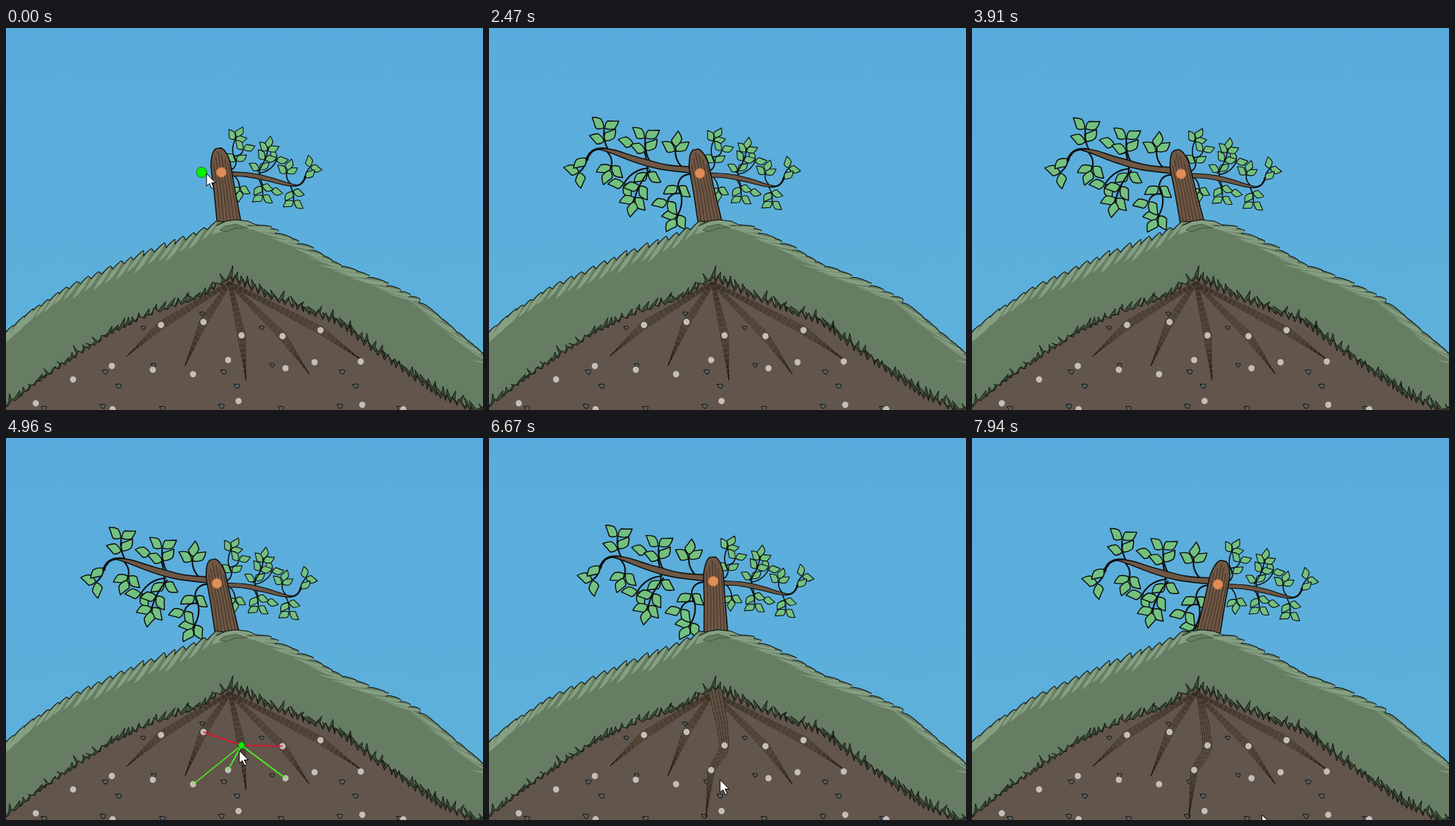
Recreate the animation shown at these times as an HTML page with a canvas. Size 640 by 512 pixels, loop 8000 ms.

```html
<!DOCTYPE html>
<html lang="en">
<head>
<meta charset="utf-8">
<title>Growing tree</title>
<style>
html, body { margin: 0; width: 100%; height: 100%; overflow: hidden; background: #5bacdb; }
canvas { display: block; }
</style>
</head>
<body>
<canvas id="stage" width="640" height="512"></canvas>
<script>
const W = 640, H = 512, LOOP = 8000;
const INK = '#0b0d0a', GRASS = '#667d63', LIGHT = '#859f82', DARK = '#3e4d3c', DIRT = '#62554b', BARK = '#6e5745';
const ctx = document.getElementById('stage').getContext('2d');

let seed = 7;
const rnd = () => (seed = (seed * 16807) % 2147483647) / 2147483647;
const span = (a, b) => a + (b - a) * rnd();

// ---------- timing: [time, x, y] ----------
const SWAY = [[150, 289], [1400, 284.5], [2470, 283], [3910, 280.5], [4440, 280.5], [4960, 283], [5650, 284],
  [6670, 301], [7940, 330]];
const POINTER = [[150, 269, 195], [1150, 270, 117], [1480, 270, 117], [2200, 478, 281], [2460, 680, 330],
  [4300, 680, 500], [4540, 480, 452], [4850, 313, 419], [5120, 313, 419], [5500, 300, 447], [6670, 310, 458],
  [6820, 310, 458], [7940, 389, 505]];
const SPROUT = 1270, PICK = 4800, ROOTED = 5500;

function at(keys, t, k = 1) {
  let i = 1;
  while (i < keys.length - 1 && keys[i][0] < t) i++;
  const a = keys[i - 1], b = keys[i];
  const f = Math.max(0, Math.min(1, (t - a[0]) / (b[0] - a[0])));
  return a[k] + (b[k] - a[k]) * f;
}

// ---------- shape helpers ----------
function paint(c, fill, line, w) {
  if (fill) { c.fillStyle = fill; c.fill(); }
  if (line) { c.strokeStyle = line; c.lineWidth = w; c.stroke(); }
}
function poly(c, pts, fill, line, w = 1, close = true) {
  c.beginPath();
  pts.forEach(p => c.lineTo(p[0], p[1]));
  if (close) c.closePath();
  paint(c, fill, line, w);
}
function dot(c, x, y, r, fill, line) {
  c.beginPath();
  c.arc(x, y, r, 0, 7);
  paint(c, fill, line, 1);
}
function layer(draw) {
  const c = document.createElement('canvas');
  c.width = W;
  c.height = H;
  draw(c.getContext('2d'));
  return c;
}
// points along an edge at irregular steps
function walk(edge, lo, hi) {
  const out = [];
  for (let x = edge[0][0]; x < W + 5;) {
    const slope = (at(edge, x + 4) - at(edge, x - 4)) / 8;
    out.push({ x, y: at(edge, x), slope });
    x += span(lo, hi) / Math.hypot(1, slope);
  }
  return out;
}

// ---------- hill ----------
const TOP = [[-12, 418], [20, 391], [75, 354], [165, 313], [240, 285], [285, 263], [308, 259], [345, 268],
  [395, 291], [440, 317], [500, 341], [550, 365], [590, 399], [645, 445]];
const UNDER = [[-5, 510], [50, 468], [145, 405], [200, 379], [265, 357], [302, 333], [350, 356], [450, 394],
  [490, 426], [540, 460], [585, 491], [645, 517]];

function grassTop(c) {
  const blades = walk(TOP, 12, 18).filter(p => p.x < 280 || p.x > 325).map(p => {
    const left = p.x < 300, r = span(.7, 1.25);
    return { ...p, left, tx: p.x + (left ? 11 : 21) * r, ty: p.y + (left ? -10 * r : 21 * r * p.slope - 4) };
  });
  c.beginPath();
  for (const b of blades) {
    c.lineTo(b.x, b.y + 1);
    c.quadraticCurveTo(b.x + (b.left ? 3 : 8), b.y - (b.left ? 4 : 1), b.tx, b.ty);
  }
  paint(c, null, INK, 2);
  c.lineTo(W + 10, H + 10);
  c.lineTo(-10, H + 10);
  c.closePath();
  paint(c, GRASS);
  for (const b of blades) {
    const d = span(15, 25), dir = b.left ? -.55 : -1.3;
    const ex = b.x + d * dir, ey = b.y + (b.left ? d : d * dir * b.slope + 9);
    c.beginPath();
    c.moveTo(b.tx, b.ty);
    c.quadraticCurveTo(b.x - 2, b.y + 2, ex, ey);
    c.quadraticCurveTo(b.x + 2, b.y + (b.left ? d * .6 : 7), b.tx, b.ty + 3);
    c.closePath();
    paint(c, LIGHT);
  }
  // tuft around the foot of the trunk
  const tuft = [[282, 265], [295, 259], [308, 257], [325, 259], [338, 265]];
  poly(c, [...tuft, [322, 264], [330, 269], [308, 266], [292, 272], [276, 277]], LIGHT);
  poly(c, tuft, null, INK, 1, false);
  poly(c, [[287, 271], [293, 266], [308, 263], [324, 268], [308, 268], [295, 273]], GRASS, '#34442f', .7);
}

function soil(c) {
  const pts = walk(UNDER, 7, 12);
  for (const { x, y } of pts) {
    const h = span(3, 12) + Math.max(0, 6 - Math.abs(x - 302)), lean = span(-7, 7);
    poly(c, [[x - 6, y + 5], [x - 2, y - 1], [x + lean, y - h], [x + 3, y], [x + 7, y + 6]], DARK, INK, .8);
  }
  const rim = pts.flatMap(({ x, y }) => [[x - 3, y + 5], [x + span(-2, 3), y - span(-1, 5)]]);
  poly(c, [...rim, [W + 10, 530], [-10, 530]], DIRT, INK, .9);

  // a stone pattern repeated every 159 px
  const stones = [[104, 383], [25, 402], [39, 452], [-26, 461], [-8, 480], [-29, 507], [51, 510]];
  for (let k = 0; k < 4; k++)
    for (const [x, y] of stones) {
      const sx = x + 159 * k, r = y > 455 ? 4 : 3.3;
      if (y < at(UNDER, sx) + 10) continue;
      poly(c, [[sx - r, y - r * .6], [sx + r * .4, y - r * .7], [sx + r, y - r * .4], [sx + r * .5, y + r * .7],
        [sx - r * .3, y + r * .6]], '#596064', INK, .9);
    }
}

const sky = layer(c => {
  const g = c.createLinearGradient(0, 0, 0, 450);
  g.addColorStop(0, '#5aabdd');
  g.addColorStop(1, '#5db1da');
  c.fillStyle = g;
  c.fillRect(0, 0, W, H);
});
const ground = layer(c => {
  c.lineJoin = 'round';
  grassTop(c);
  soil(c);
});

// ---------- roots ----------
const TIPS = [[162, 440], [240, 453], [407, 464], [477, 445]];
const NODES = [[208, 398], [265, 394], [371, 413], [422, 405], [316, 412], [298, 445], [251, 464], [375, 456],
  [476, 447], [414, 448], [197, 458], [142, 453], [90, 471], [40, 503], [143, 511], [312, 500], [478, 505], [533, 511]];
const [HUB, NEXT] = NODES.slice(4);

// knots: [x, y, half width]
function root(knots) {
  const side = k => knots.map(([x, y, w], i) => {
    const a = knots[Math.max(0, i - 1)], b = knots[Math.min(knots.length - 1, i + 1)];
    const dx = b[0] - a[0], dy = b[1] - a[1], s = k * w / Math.hypot(dx, dy);
    return [x - dy * s, y + dx * s];
  });
  poly(ctx, [...side(-1), ...side(1).reverse()], '#5e5142');
  ctx.setLineDash([6, 1]);
  for (let k = -1; k <= 1.01; k += .5) poly(ctx, side(k), null, 'rgba(24,18,10,.75)', .8, false);
  ctx.setLineDash([]);
}

function drawRoots(t) {
  TIPS.forEach(([x, y], i) => root([[300, 342, 2], [...NODES[i], 5], [x, y, 0]]));
  if (t < ROOTED) return root([[300, 340, 2], [...HUB, 5], [322, 472, 0]]);
  const w = at([[6750, 9], [7800, 2]], t);
  root([[303, 338, w], [312, 380, Math.max(w * .8, 5.5)], [...HUB, 6], [313, 423, 5.5], [...NEXT, 4.5], [291, 508, 0]]);
}

function drawLinks() {
  [1, 2, 5, 6, 7].forEach(i => poly(ctx, [HUB, NODES[i]], null, i < 3 ? '#f00a28' : '#4bf520', 1.6, false));
  dot(ctx, ...HUB, 4.2, '#08f008', '#0a8a20');
}

// ---------- tree ----------
// twig: start, end, bend, number of leaves
const TWIGS = [[163, 166, 156, 135, -3, 4], [212, 180, 196, 156, 6, 1], [219, 182, 211, 148, -3, 4],
  [262, 188, 252, 160, -4, 3], [133, 175, 123, 193, -2, 2], [138, 169, 132, 174, 0, 1], [160, 166, 164, 190, -4, 3],
  [216, 188, 183, 208, 5, 2], [214, 182, 214, 194, 0, 2], [218, 190, 196, 232, 3, 5], [272, 196, 255, 212, 5, 2],
  [256, 213, 252, 255, -6, 3], [258, 222, 241, 232, 4, 2]];

function leaf(x, y, angle) {
  ctx.save();
  ctx.translate(x, y);
  ctx.rotate(angle);
  ctx.beginPath();
  ctx.moveTo(1, 0);
  ctx.quadraticCurveTo(4, -6, 9, -7);
  ctx.quadraticCurveTo(14, -4, 22, 0);
  ctx.quadraticCurveTo(17, 5, 12, 6.5);
  ctx.quadraticCurveTo(5, 5, 1, 0);
  ctx.closePath();
  paint(ctx, '#73c180', INK, 1.4);
  ctx.restore();
}

// leaves sit in pairs from the end backwards; an odd one points ahead
function twig([x0, y0, x1, y1, bend, leaves]) {
  const dx = x1 - x0, dy = y1 - y0, len = Math.hypot(dx, dy);
  const cx = (x0 + x1) / 2 - dy / len * bend * 2, cy = (y0 + y1) / 2 + dx / len * bend * 2;
  ctx.beginPath();
  ctx.moveTo(x0, y0);
  ctx.quadraticCurveTo(cx, cy, x1, y1);
  paint(ctx, null, INK, 2);
  const odd = leaves % 2, end = Math.atan2(y1 - cy, x1 - cx);
  for (let i = odd; i < leaves; i += 2) {
    const s = 1 - (odd * 5 + (i - odd) * 8.5) / len, r = 1 - s;
    const x = r * r * x0 + 2 * r * s * cx + s * s * x1, y = r * r * y0 + 2 * r * s * cy + s * s * y1;
    const a = Math.atan2(r * (cy - y0) + s * (y1 - cy), r * (cx - x0) + s * (x1 - cx));
    leaf(x, y, a - .96);
    leaf(x, y, a + .96);
  }
  if (odd) leaf(x1, y1, end);
}

function branch() {
  ctx.beginPath();
  ctx.moveTo(158, 162);
  ctx.bezierCurveTo(142, 160, 134, 168, 133, 178);
  paint(ctx, null, INK, 3);
  TWIGS.forEach(twig);
  ctx.beginPath();
  ctx.moveTo(278, 186);
  ctx.bezierCurveTo(235, 186, 228, 180, 200, 173);
  ctx.bezierCurveTo(178, 167, 168, 160, 146, 162);
  ctx.bezierCurveTo(165, 166, 178, 174, 200, 181);
  ctx.bezierCurveTo(225, 190, 240, 191, 278, 195);
  ctx.closePath();
  paint(ctx, BARK, INK, 1.4);
}

function trunk() {
  ctx.beginPath();
  ctx.moveTo(-15, 92);
  ctx.lineTo(-13, 25);
  ctx.lineTo(-13, -10);
  ctx.bezierCurveTo(-11, -22, -8, -31, -3, -32.5);
  ctx.lineTo(4, -32.5);
  ctx.bezierCurveTo(9, -29, 12, -20, 13.5, -11);
  ctx.lineTo(15, 25);
  ctx.lineTo(19, 92);
  ctx.closePath();
  paint(ctx, BARK, INK, 1.4);
  for (let x = -9; x <= 11; x += 4) {
    const top = Math.abs(x) * 1.8 - 30;
    poly(ctx, [[x, top], [x + 1, 25], [x * 1.25, 90]], null, '#382a20', .8, false);
  }
}

function drawTree(t) {
  const x = at(SWAY, t), y = 192 + .0064 * (x - 304) ** 2;
  // the right branch is the left one, smaller and turned round
  ctx.save();
  ctx.translate(x + 85, y - 8.3);
  ctx.rotate(176.5 * Math.PI / 180);
  ctx.scale(.745, .745);
  ctx.translate(-168.3, -198);
  branch();
  ctx.restore();
  if (t >= SPROUT) {
    ctx.save();
    ctx.translate(x - 284.5, y - 195);
    branch();
    ctx.restore();
  }
  ctx.save();
  ctx.translate(x, y);
  ctx.rotate(Math.asin((x - 304) / 118));
  trunk();
  ctx.restore();
  dot(ctx, x, y, 6.6, '#e08d56', '#c0723f');
  if (t < SPROUT) dot(ctx, x - 26.5, y, 7, '#05f005', '#0a7a2a');
}

function drawPointer(t) {
  const x = at(POINTER, t), y = at(POINTER, t, 2);
  const arrow = [[0, 0], [0, 17], [4, 13.5], [7, 20], [9.7, 18.8], [6.8, 12.6], [12, 12.4]];
  poly(ctx, arrow.map(p => [p[0] + x, p[1] + y]), '#fff', '#000', 1);
}

function frame(t) {
  ctx.drawImage(sky, 0, 0);
  drawTree(t);
  ctx.drawImage(ground, 0, 0);
  drawRoots(t);
  NODES.forEach(([x, y]) => dot(ctx, x, y, 4.2, '#c3beb9'));
  if (t >= PICK && t < ROOTED) drawLinks();
  drawPointer(t);
}

ctx.lineJoin = 'round';
const start = performance.now();
function tick() {
  frame((performance.now() - start) % LOOP);
  requestAnimationFrame(tick);
}
tick();
</script>
</body>
</html>
```
